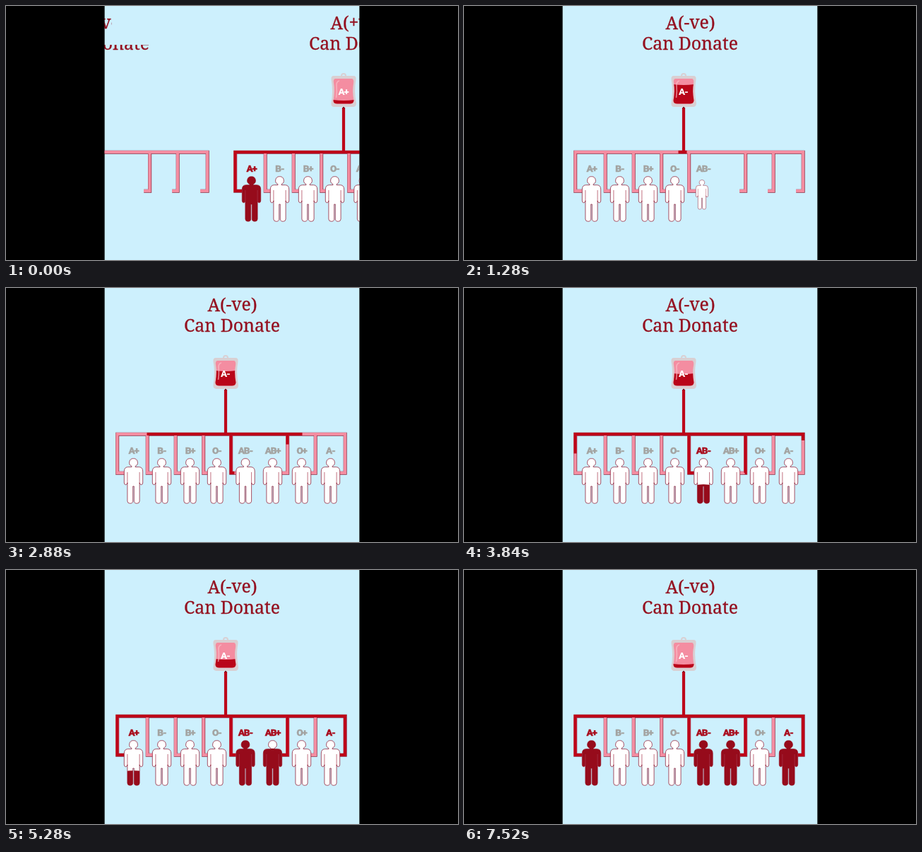
An HTML page that plays this animation: 640x360 px, repeating every 7680 ms.

```html
<!DOCTYPE html>
<html lang="en">
<head>
<meta charset="utf-8">
<title>Blood donation</title>
<style>
  html, body { margin: 0; width: 100%; height: 100%; overflow: hidden; background: #000; }
  svg { display: block; width: 100vw; height: 100vh; }
  text { text-anchor: middle; }
  .title { font: 24.8px "Noto Serif", serif; fill: #94101f; stroke: #94101f; stroke-width: .3; }
  .label { font: 900 13.4px Roboto, "Open Sans", sans-serif; font-stretch: 75%; letter-spacing: -1.1px; fill: #a3a3a1; stroke: #a3a3a1; stroke-width: .4; }
  .label.on { fill: #a90b1c; stroke: #a90b1c; }
  .label.bag-label { fill: #fff; stroke: none; }
  .pipe { fill: none; stroke-width: 3.9; }
  .edge { stroke: #8d2c42; stroke-width: 5; }
  .empty { stroke: #f48da1; }
  .blood { stroke: #bd0519; stroke-width: 4.2; }
  .body { fill: #fff; stroke: #94283f; stroke-width: .8; }
  .full { fill: #960b1b; }
  .arms { fill: none; stroke: #a8354d; stroke-width: .7; }
</style>
</head>
<body>
<svg viewBox="0 0 640 360">
  <defs>
    <path id="bag" d="M299 103H323Q326 104 325 110Q323 120 325.5 134Q325 138.5 320 138.5H302Q296.5 138.5 296.5 134Q299 120 297 109Q296 104 299 103Z"/>
    <path id="person" d="M0 241.7A5.7 5.7 0 0 1 2.5 252.6V253.7H8Q13.2 254 13.2 260V276Q13 278.8 11 278.8Q8.9 278.8 8.6 276V302Q8.4 305.3 5 305.3Q.8 305.3 .8 302V281H-.8V302Q-.8 305.3-5 305.3Q-8.4 305.3-8.6 302V276Q-8.9 278.8-11 278.8Q-13 278.8-13.2 276V260Q-13.2 254-8 253.7H-2.5V252.6A5.7 5.7 0 0 1 0 241.7Z"/>
    <clipPath id="in-bag"><use href="#bag"/></clipPath>
    <clipPath id="in-person"><use href="#person"/></clipPath>
    <clipPath id="reveal"><path d="M139 0H335V45H139ZM139 55H501V80H139Z"/></clipPath>
  </defs>
  <rect x="139.4" width="361.2" height="360" fill="#cdf0fd"/>
  <g id="next"></g>
  <g id="last"></g>
  <rect width="139.4" height="360"/>
  <rect x="500.6" width="139.4" height="360"/>
</svg>
<script>
const LOOP = 7680, STEP = 160, WIDTH = 362;
const TOP = 207, FOOT = 262;
// type, person x, hook x, foot x
const people = [
  ['A+', 181, 157.5, 168], ['B-', 221, 200, 209], ['B+', 261, 240, 250], ['O-', 299, 279.5, 289],
  ['AB-', 339.5, 318.5, 328], ['AB+', 378, 398.5, 390], ['O+', 419, 438, 430], ['A-', 460, 480, 470]
];
const fillStart = { 'AB-': 3240, 'AB+': 4125, 'A+': 4810, 'A-': 5290 };
const flowKeys = [[0, 0], [640, 36], [1920, 105], [3840, 244], [4800, 313]];
const levelKeys = [[0, 106], [640, 108], [1920, 112], [3840, 120], [5280, 125], [6400, 130], [7520, 132]];
const popKeys = [[0, 0], [80, .25], [240, 1.06], [320, 1]];

const clamp = (v, max) => Math.max(0, Math.min(max, v));

function track(keys, t) {
  if (t <= keys[0][0]) return keys[0][1];
  for (let i = 1; i < keys.length; i++) {
    const [t0, a] = keys[i - 1], [t1, b] = keys[i];
    if (t <= t1) return a + (b - a) * (t - t0) / (t1 - t0);
  }
  return keys[keys.length - 1][1];
}

const hook = (x, foot) => `M${x} ${TOP}V${FOOT}H${foot}`;
const side = ([, , x, foot]) => `M311 ${TOP}H${x}V${FOOT}H${foot}`;
const stem = `M311 144V${TOP + 2}`;
const frame = side(people[0]) + side(people[7]) +
  people.slice(1, 7).map(p => hook(p[2], p[3])).join('');

function personMarkup([type, x]) {
  return `<text class="label" x="${x - .5}" y="235.2">${type}</text>
    <g class="figure"><g transform="translate(${x - .5})">
      <use href="#person" class="body"/>
      <g clip-path="url(#in-person)"><path class="full"/></g>
      <path class="arms" d="M-8.6 261V277M8.6 261V277"/>
    </g></g>`;
}

function buildSlide(id, type) {
  const root = document.getElementById(id);
  const bloodPaths = [stem, side(people[0]), side(people[7]), hook(318.5, 328), hook(398.5, 390)];
  root.innerHTML = `
    <g class="heading">
      <text class="title" x="320.5" y="33">A(<tspan dy="-1.5">${type[1]}ve</tspan><tspan dy="1.5">)</tspan></text>
      <text class="title" x="320" y="61.5">Can Donate</text>
    </g>
    <g class="scene">
      <path class="pipe edge" d="${frame}" transform="translate(.2 .2)"/>
      <path class="pipe empty" d="${stem + frame}"/>
      ${bloodPaths.map(d => `<path class="pipe blood" d="${d}"/>`).join('')}
      <path d="M311 137V145" stroke="#7d1624" stroke-width="2"/>
      <circle cx="311" cy="99" r="3" fill="none" stroke="#d9d0d3" stroke-width="2"/>
      <path fill="#d9cfd2" d="M297 99H325Q329 99 328.5 104Q325.5 120 329 138Q329 143 324 143H298Q293 143 293.5 138Q296.5 120 293.5 104Q293 99 297 99Z"/>
      <use href="#bag" fill="#f48da1"/>
      <g clip-path="url(#in-bag)"><path class="level" fill="#b90519"/></g>
      <path d="M305 106Q300.5 107 301 113Q302 121 300.5 130" fill="none" stroke="#fbc3cd" stroke-width="1.6" opacity=".65"/>
      <text class="label bag-label" x="310.5" y="125.7">${type}</text>
      ${people.map(personMarkup).join('')}
    </g>`;
  const all = s => [...root.querySelectorAll(s)];
  return {
    root, heading: all('.heading')[0], scene: all('.scene')[0],
    level: all('.level')[0], blood: all('.blood'), labels: all('.label:not(.bag-label)'),
    figures: all('.figure'), fills: all('.full')
  };
}

function place(slide, x, lead) {
  slide.scene.setAttribute('transform', `translate(${x})`);
  slide.heading.setAttribute('transform', `translate(${x + lead})`);
}

function setLevel(slide, y) {
  slide.level.setAttribute('d', `M290 ${y}Q311 ${y + 4} 332 ${y}V145H290Z`);
}

function setBlood(slide, lengths) {
  slide.blood.forEach((p, i) => p.setAttribute('stroke-dasharray', `${Math.max(0, lengths[i])} 999`));
}

function setFill(slide, i, amount, lit) {
  const y = 306 - 65 * amount;
  slide.fills[i].setAttribute('d', amount > 0 ? `M-15 ${y + 1.5}Q0 ${y - 2} 15 ${y + 1.5}V310H-15Z` : '');
  slide.labels[i].classList.toggle('on', lit);
}

const next = buildSlide('next', 'A-');
const last = buildSlide('last', 'A+');
setLevel(last, 132);
setBlood(last, [999, 999, 169, 0, 999]);
people.forEach(([type], i) => {
  const given = type === 'A+' || type === 'AB+';
  setFill(last, i, given ? 1.1 : 0, given);
});

function draw(t) {
  const left = clamp(1 - t / 400, 1) ** 2;
  const shift = -195 * left, lead = 10 * left;
  place(next, shift, lead);
  place(last, shift + WIDTH, lead);
  last.root.style.display = left > 0 ? '' : 'none';
  // the incoming heading is still being uncovered
  next.heading.setAttribute('clip-path', t < STEP ? 'url(#reveal)' : 'none');

  const flow = track(flowKeys, t), run = flow - 63;
  setBlood(next, [Math.min(flow, 65), run, run - 3, (t - 1680) * .05, (t - 2540) * .043]);
  setLevel(next, track(levelKeys, t));

  people.forEach(([type, x], i) => {
    const age = t - i * 280;
    const scale = track(popKeys, age);
    const ox = x - 6.5, oy = 255.5;
    next.figures[i].setAttribute('transform', `translate(${ox} ${oy}) scale(${scale}) translate(${-ox} ${-oy})`);
    next.figures[i].style.display = scale > 0 ? '' : 'none';
    next.labels[i].style.display = age >= 160 ? '' : 'none';
    const start = fillStart[type] || Infinity;
    setFill(next, i, clamp((t - start) / 1420, 1.1), t >= start - 120);
  });
}

const begin = performance.now();
function tick() {
  const t = (performance.now() - begin) % LOOP;
  draw(Math.floor(t / STEP) * STEP);
  requestAnimationFrame(tick);
}
tick();
</script>
</body>
</html>
```
